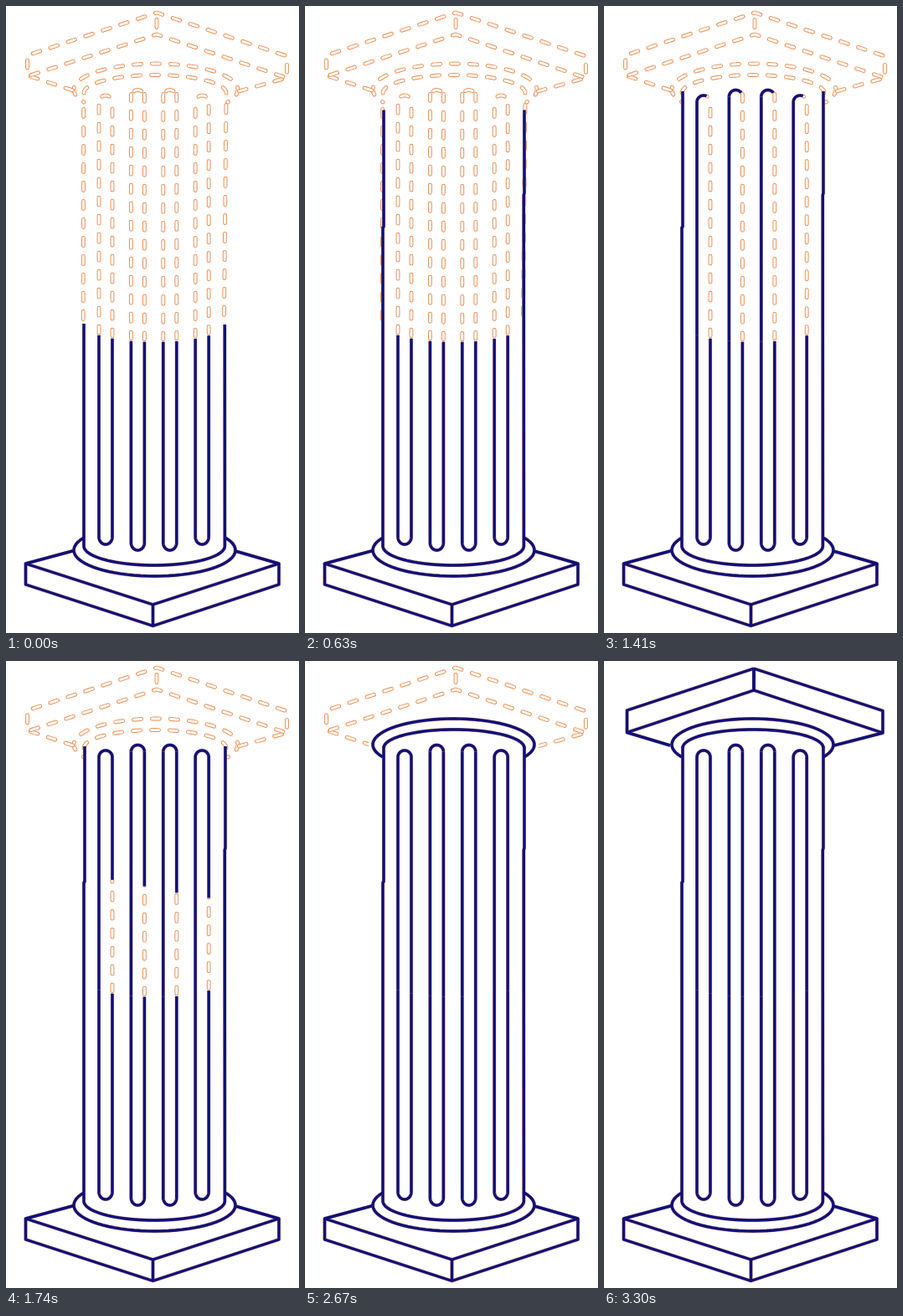
Write an HTML page with a canvas that moves like this. It is 350x750 px and loops after 8 s.

```html
<!DOCTYPE html>
<html lang="en">
<head>
<meta charset="utf-8">
<title>Column</title>
<style>
html, body { margin: 0; width: 100%; height: 100%; overflow: hidden; background: #fff; }
canvas { display: block; }
</style>
</head>
<body>
<canvas id="stage" width="350" height="750"></canvas>
<script>
const ctx = document.getElementById('stage').getContext('2d');
const NAVY = '#10107a', ORANGE = '#ea8b4c', RUST = '#d9a184';
const LOOP = 8000, STEP = 30, PERIOD = 22, DASH = 9;
const PI = Math.PI, TILT = 0.503, MID = 177.5;

// Points along an elliptic arc
function arc(cx, cy, rx, ry, from, to) {
  return Array.from({ length: 49 }, (_, i) => {
    const a = from + (to - from) * i / 48;
    return [cx + rx * Math.cos(a), cy + ry * Math.sin(a)];
  });
}

const gap = (a, b) => Math.hypot(b[0] - a[0], b[1] - a[1]);
const pathLength = pts => pts.slice(1).reduce((sum, p, i) => sum + gap(pts[i], p), 0);

// Leading share f of a polyline, measured by length
function part(pts, f) {
  if (f >= 1) return pts;
  let left = pathLength(pts) * f;
  const out = [pts[0]];
  for (let i = 1; i < pts.length; i++) {
    const a = pts[i - 1], b = pts[i], d = gap(a, b);
    if (d >= left) {
      const k = d ? left / d : 0;
      out.push([a[0] + (b[0] - a[0]) * k, a[1] + (b[1] - a[1]) * k]);
      break;
    }
    out.push(b);
    left -= d;
  }
  return out;
}

function stroke(pts, color, width, cap = 'butt') {
  ctx.beginPath();
  pts.forEach(([x, y]) => ctx.lineTo(x, y));
  ctx.strokeStyle = color;
  ctx.lineWidth = width;
  ctx.lineCap = cap;
  ctx.lineJoin = 'round';
  ctx.stroke();
}

// Hollow rounded dashes, one of them centred at distance `at` along the path
function dashes(pts, at = pathLength(pts) / 2) {
  ctx.setLineDash([DASH, PERIOD - DASH]);
  ctx.lineDashOffset = DASH / 2 - at;
  stroke(pts, ORANGE, 4.8, 'round');
  stroke(pts, '#fff', 2.9, 'round');
  ctx.setLineDash([]);
}

// Share of a stage done, counting the step now shown
function progress(t, start, end) {
  return Math.max(0, Math.min(1, (t - start + STEP) / (end - start + STEP)));
}
const easeOut = (p, k) => 1 - Math.pow(1 - p, k);

// The lower half ends along a rounded front edge
const split = x => 378 + 24 * Math.sqrt(1 - ((x - MID) / 88) ** 2);

const flutes = [0, 1, 2, 3].map(i => {
  const inner = i === 1 || i === 2;
  const l = 111 + 38.4 * i, r = l + 16, cx = l + 8;
  const top = inner ? 108.5 : 115, bottom = inner ? 642 : 635;
  return {
    rise: [[l, split(l)], [l, top]],
    cap: arc(cx, top, 8, 8, PI, 2 * PI),
    fall: [[r, top], [r, split(r)]],
    base: [[l, split(l)], ...arc(cx, bottom, 8, 9, PI, 0), [r, split(r)]],
    capDash: arc(cx, top, 8, 8, PI * 1.32, PI * 1.68),
    sideDash: [l, r].map(x => [[x, split(x) - 3], [x, top - 3]]),
    capEase: inner ? 5 : 3.25,
    fallEase: 2.3 + 0.2 * i
  };
});

const sides = [
  [[93, 380], [93, 265], [94, 264], [94, 102]],
  [[261.3, 381], [261.3, 226], [262, 224], [262, 102]]
];
const sideDashes = [
  [[92.2, 376], [92.7, 118]],
  [[260.5, 371], [263, 118]]
];

const base = [
  [[93, 380], ...arc(177.2, 646, 84.2, 23, PI, 0), [261.3, 381]],
  arc(MID, 651, 96.5, 31, PI + TILT, -TILT),
  [[81, 651.5], [23.5, 667], [175.5, 716], [326, 667], [274, 652]],
  [[23.5, 667], [23.5, 692], [175.5, 741.5], [326, 692], [326, 667]],
  [[175.5, 716], [175.5, 741.5]],
  ...flutes.map(f => f.base)
];

const rings = [
  arc(178, 104, 84, 22, PI, 2 * PI),
  arc(MID, 100, 96.5, 31, TILT, -PI - TILT)
];
const ringDashes = [
  arc(178, 104, 85, 21.5, PI, 2 * PI),
  arc(179, 100, 98, 31, PI - TILT, 2 * PI + TILT)
];

const apex = [179, 9], front = [179, 35];
const slabRim = [
  [[79, 101], [27.5, 85.5], [27.5, 59], apex],
  [[275, 101], [333, 86], [333, 59.5], apex]
];
const slabFace = [
  [[27.5, 85.5], front, apex],
  [[333, 86], front, apex]
];
const rimDash = [[80, 101], [25.5, 83], [25.5, 59], [180, 8], [335.5, 60], [335.5, 86], [278, 102]];
const faceDash = [[25.5, 84], [180, 34], [335.5, 86]];
const edgeDash = [[180, 13], [180, 29]];

function drawDashes(t) {
  if (t < 690) sideDashes.forEach(p => dashes(p, 6));
  if (t < 1980) {
    for (const f of flutes) {
      f.sideDash.forEach(p => dashes(p, 3));
      dashes(f.capDash);
    }
  }
  if (t < 2640) ringDashes.forEach(p => dashes(p));
  if (t < 2940) dashes(rimDash);
  if (t < 3300) [faceDash, edgeDash].forEach(p => dashes(p));
}

function draw(t) {
  ctx.fillStyle = '#fff';
  ctx.fillRect(0, 0, 350, 750);
  drawDashes(t);

  const lines = [];
  const add = (pts, f, clear = 10) => {
    if (f > 0) lines.push({ pts: part(pts, f), clear });
  };

  const side = easeOut(progress(t, 240, 690), 1.21);
  sides.forEach(p => add(p, side, 0));

  const rise = easeOut(progress(t, 870, 1320), 1.21);
  const cap = progress(t, 1350, 1650);
  const fall = progress(t, 1680, 1980);
  for (const f of flutes) {
    add(f.rise, rise);
    add(f.cap, easeOut(cap, f.capEase));
    add(f.fall, easeOut(fall, f.fallEase));
  }

  const ring = progress(t, 2160, 2640) ** 2;
  rings.forEach(p => add(p, ring));

  const rim = progress(t, 2700, 2940), face = progress(t, 2970, 3300);
  slabRim.forEach(p => add(p, rim));
  slabFace.forEach(p => add(p, face));

  // Clear the dashes behind each finished stretch, then ink it
  for (const l of lines) if (l.clear) stroke(l.pts, '#fff', l.clear);
  const inked = [...base, ...lines.map(l => l.pts)];
  for (const p of inked) stroke(p, RUST, 4.2);
  for (const p of inked) stroke(p, NAVY, 3.4);
}

const begin = performance.now();
function tick() {
  const t = (performance.now() - begin) % LOOP;
  draw(Math.floor(t / STEP) * STEP);
  requestAnimationFrame(tick);
}
tick();
</script>
</body>
</html>
```
